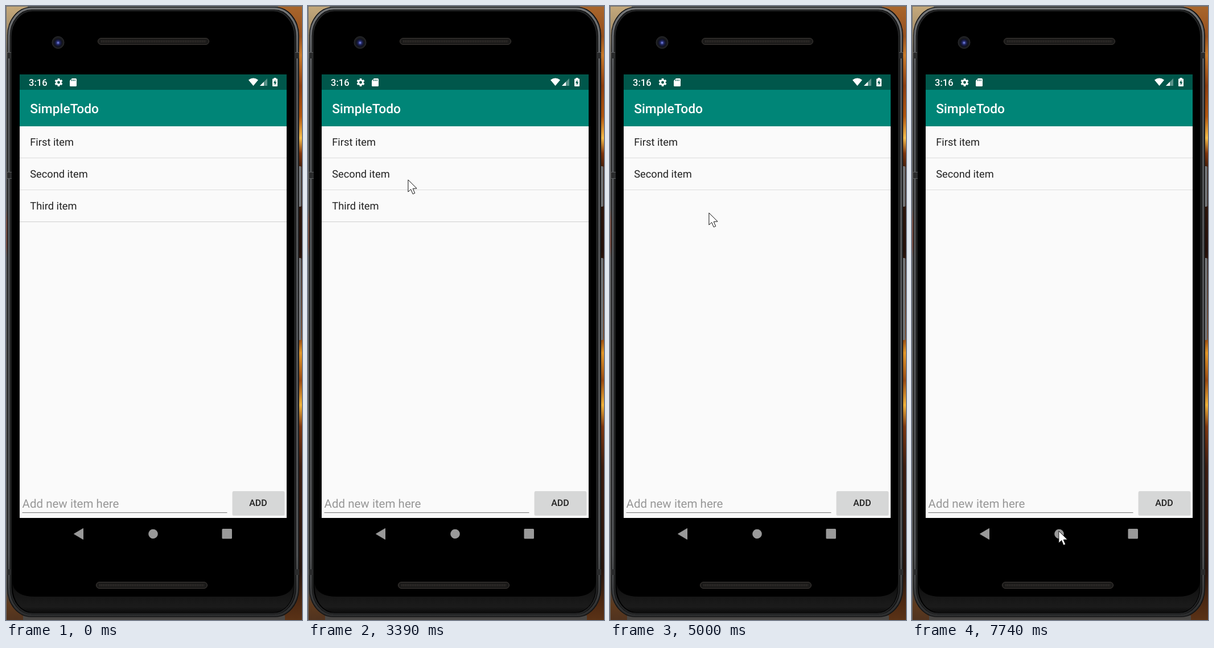
Write an HTML page that moves like this. It is 520 by 1077 pixels and loops after 8000 ms.

```html
<!DOCTYPE html>
<html lang="en">
<head>
<meta charset="utf-8">
<title>To-do list</title>
<style>
  html, body { margin: 0; width: 100%; height: 100%; overflow: hidden; background: #000; }
  svg { display: block; width: 520px; height: 1077px; }
  text { font-family: Roboto, sans-serif; text-rendering: geometricPrecision; }
  .item { font-size: 18.26px; fill: #212121; }
  .medium { font-weight: 500; }
</style>
</head>
<body>
<svg viewBox="0 0 520 1077" xmlns="http://www.w3.org/2000/svg">
  <defs>
    <linearGradient id="wallLeft" x2="0" y2="1">
      <stop offset="0" stop-color="#c5a97b"/><stop offset=".05" stop-color="#a08a68"/>
      <stop offset=".09" stop-color="#5c5d5e"/><stop offset=".33" stop-color="#504e4c"/>
      <stop offset=".35" stop-color="#8a3a22"/><stop offset=".39" stop-color="#84301a"/>
      <stop offset=".41" stop-color="#505050"/><stop offset=".95" stop-color="#454443"/>
      <stop offset=".975" stop-color="#5e3a1e"/><stop offset="1" stop-color="#50331f"/>
    </linearGradient>
    <linearGradient id="wallRight" x2="0" y2="1">
      <stop offset="0" stop-color="#a9662c"/><stop offset=".05" stop-color="#96501e"/>
      <stop offset=".08" stop-color="#c87a2a"/><stop offset=".13" stop-color="#8c3d10"/>
      <stop offset=".18" stop-color="#b0560f"/><stop offset=".215" stop-color="#f4bb4a"/>
      <stop offset=".24" stop-color="#7e340c"/><stop offset=".27" stop-color="#32180c"/>
      <stop offset=".4" stop-color="#24110c"/><stop offset=".54" stop-color="#8c4210"/>
      <stop offset=".565" stop-color="#e0962a"/><stop offset=".61" stop-color="#984a12"/>
      <stop offset=".65" stop-color="#eeb03a"/><stop offset=".685" stop-color="#7c3610"/>
      <stop offset=".75" stop-color="#3c1c10"/><stop offset=".92" stop-color="#26150e"/>
      <stop offset=".97" stop-color="#4c2812"/><stop offset="1" stop-color="#5a3216"/>
    </linearGradient>
    <linearGradient id="rim" x2="0" y2="1">
      <stop offset="0" stop-color="#757779"/><stop offset=".1" stop-color="#55575a"/>
      <stop offset=".9" stop-color="#515355"/><stop offset="1" stop-color="#2c2d2e"/>
    </linearGradient>
    <linearGradient id="chin" x2="0" y2="1">
      <stop offset="0" stop-color="#060606"/><stop offset=".35" stop-color="#141414"/>
      <stop offset=".8" stop-color="#1b1b1b"/><stop offset="1" stop-color="#0a0a0a"/>
    </linearGradient>
    <linearGradient id="key">
      <stop offset="0" stop-color="#3c3d3f"/><stop offset=".5" stop-color="#85878a"/>
      <stop offset="1" stop-color="#5a5c5f"/>
    </linearGradient>
    <radialGradient id="lens">
      <stop offset="0" stop-color="#aab2f4"/><stop offset=".18" stop-color="#4a55b4"/>
      <stop offset=".5" stop-color="#1c2050"/><stop offset="1" stop-color="#0d0e16"/>
    </radialGradient>
  </defs>

  <!-- wallpaper -->
  <rect width="260" height="1077" fill="url(#wallLeft)"/>
  <rect x="260" width="260" height="1077" fill="url(#wallRight)"/>
  <rect x="38" width="440" height="3" fill="#5d6163"/>
  <rect x="30" y="1069" width="460" height="8" fill="#4a4846"/>
  <path d="M0 .5H520M.5 0V1077" stroke="#6c6f71"/>

  <!-- side keys -->
  <g fill="url(#key)">
    <rect x="512" y="281" width="7" height="71" rx="2"/>
    <rect x="512" y="442" width="7" height="144" rx="2"/>
  </g>

  <!-- phone -->
  <rect x="2" y="1.500" width="513" height="1070.500" rx="42" ry="50" fill="#141516"/>
  <rect x="5" y="4.500" width="506.500" height="1064.500" rx="40" ry="48" fill="#0b0b0b" stroke="url(#rim)" stroke-width="3.500"/>
  <rect x="8.500" y="8" width="499" height="1058" rx="38" ry="46" fill="#000" stroke="#232425" stroke-width="2.500"/>
  <path d="M11 1010Q14 1036 50 1036H467Q503 1036 506 1010Q506 1065 460 1065H57Q11 1065 11 1010Z" fill="url(#chin)"/>
  <g fill="#2a2b2c">
    <rect x="2" y="82" width="7" height="10"/><rect x="508" y="82" width="7" height="10"/>
    <rect x="2" y="292" width="8" height="10"/>
    <rect x="2" y="988" width="7" height="10"/><rect x="508" y="988" width="7" height="10"/>
  </g>
  <path d="M2 81.500H9M508 81.500H515M2 291.500H10M2 302.500H10" stroke="#5c5e60"/>

  <circle cx="91.500" cy="64" r="10.500" fill="#1b1c1f" stroke="#2d2e31"/>
  <circle cx="91.500" cy="64.500" r="7.500" fill="url(#lens)"/>
  <g fill="#1b1a19" stroke="#3f3b38">
    <rect x="161.500" y="56.500" width="195" height="11" rx="5.500"/>
    <rect x="158.500" y="1010.500" width="195" height="11" rx="5.500"/>
  </g>
  <path d="M167 62H351M164 1016H348" stroke="#2c2927" stroke-width="4" stroke-dasharray="2 1"/>

  <!-- app -->
  <rect x="24" y="120" width="469" height="778" fill="#fafafa"/>
  <rect x="24" y="120" width="469" height="28" fill="#00574b"/>
  <rect x="24" y="147" width="469" height="64" fill="#008577"/>
  <text class="medium" x="40" y="140" font-size="16.500" fill="#fff">3:16</text>
  <text class="medium" x="42.260" y="188" font-size="22.820" fill="#fff">SimpleTodo</text>

  <!-- status icons -->
  <g fill="#fff">
    <g id="gear" transform="translate(92.500 134)"></g>
    <path d="M116 127H122.500Q124 127 124 128.500V139.500Q124 141 122.500 141H113.500Q112 141 112 139.500V131Z"/>
    <path d="M426 129.800Q434.500 123 443 129.800L434.500 140Z"/>
    <path d="M459 127V140H446Z" fill-opacity=".35"/>
    <path d="M453 133V140H446Z"/>
    <path d="M470.500 127.500V126H474.500V127.500H476Q477 127.500 477 128.500V140Q477 141 476 141H469Q468 141 468 140V128.500Q468 127.500 469 127.500Z"/>
  </g>
  <path d="M115.500 129V131.500M118.300 129V131.500M121.100 129V131.500" stroke="#00574b" stroke-width="1.300"/>
  <path d="M473.300 129.500L469.800 135.300H472V139.300L475.300 133.500H473.300Z" fill="#00574b"/>

  <!-- list -->
  <g fill="#dcdcdc">
    <rect x="24" y="266" width="469" height="1"/>
    <rect x="24" y="322" width="469" height="1"/>
    <rect id="lastLine" x="24" y="378" width="469" height="1" fill="#cfcfcf"/>
  </g>
  <rect id="press" x="24" y="323" width="469" height="55" fill="#d9d9d9"/>
  <text class="item" x="42.260" y="245">First item</text>
  <text class="item" x="42.260" y="301">Second item</text>
  <text class="item" id="third" x="42.260" y="357">Third item</text>

  <!-- entry bar -->
  <text x="28.500" y="880" font-size="20.540" fill="#979797">Add new item here</text>
  <rect x="28.500" y="888" width="360" height="1.200" fill="#858585"/>
  <rect x="397.500" y="851.500" width="92" height="42.500" rx="2.500" fill="#000" fill-opacity=".13"/>
  <rect x="398" y="851" width="91" height="41.500" rx="2" fill="#d6d7d7"/>
  <text class="medium" x="443" y="877" font-size="16" fill="#212121" text-anchor="middle">ADD</text>

  <!-- navigation -->
  <g fill="#999">
    <path d="M119.500 926L135.500 916.500V935.500Z" stroke="#999" stroke-linejoin="round"/>
    <circle cx="258.500" cy="926" r="8.300"/>
    <rect x="379.500" y="917" width="17.500" height="17.500" rx="1.500"/>
  </g>

  <path id="cursor" d="M.9 .9V22L5.700 17.500L9.200 25.800L12.700 24.300L9.200 16.300L16.100 16Z" fill="#fff" stroke="#111" stroke-linejoin="round"/>
</svg>
<script>
const LOOP = 8000;
const $ = id => document.getElementById(id);

// Pointer moves: start, end, then the tip at evenly spaced steps.
const moves = [
  [1210, 1210, [499, 228]],
  [1470, 1640, [189, 241], [190, 270], [179, 279]],
  [1820, 1820, [175, 296]],
  [3390, 3730, [175, 304], [174, 321], [173, 341], [173, 357], [173, 362]],
  [5740, 6100, [219, 497], [328, 770], [368, 857], [368, 889], [368, 897]],
  [6280, 6280, [368, 900]],
  [6440, 6940, [361, 900], [343, 922], [314, 941], [289, 943], [271, 936], [260, 923], [255, 916]],
  [7120, 7120, [256, 916]],
  [7400, 7400, [258, 918]],
  [7740, 7740, [257, 920]]
];

function tipAt(t) {
  const move = moves.filter(m => m[0] <= t).pop();
  if (!move) return null;
  const [start, end, ...tips] = move;
  if (t >= end) return tips[tips.length - 1];
  return tips[Math.floor((t - start) / (end - start) * (tips.length - 1))];
}

function show(id, on) {
  $(id).setAttribute("visibility", on ? "visible" : "hidden");
}

function drawGear() {
  let parts = "";
  for (let a = 0; a < 360; a += 60)
    parts += `<rect x="-1.8" y="-7" width="3.6" height="4" rx=".6" transform="rotate(${a})"/>`;
  $("gear").innerHTML = parts +
    '<circle r="3.8" fill="none" stroke="#fff" stroke-width="2.8"/>';
}

function render(t) {
  const tip = tipAt(t);
  show("cursor", tip);
  if (tip) $("cursor").setAttribute("transform", `translate(${tip})`);
  show("press", t >= 4570 && t < 5000);
  show("third", t < 4850);
  show("lastLine", t < 4850);
}

function tick() {
  render(performance.now() % LOOP);
  requestAnimationFrame(tick);
}

drawGear();
tick();
</script>
</body>
</html>
```
